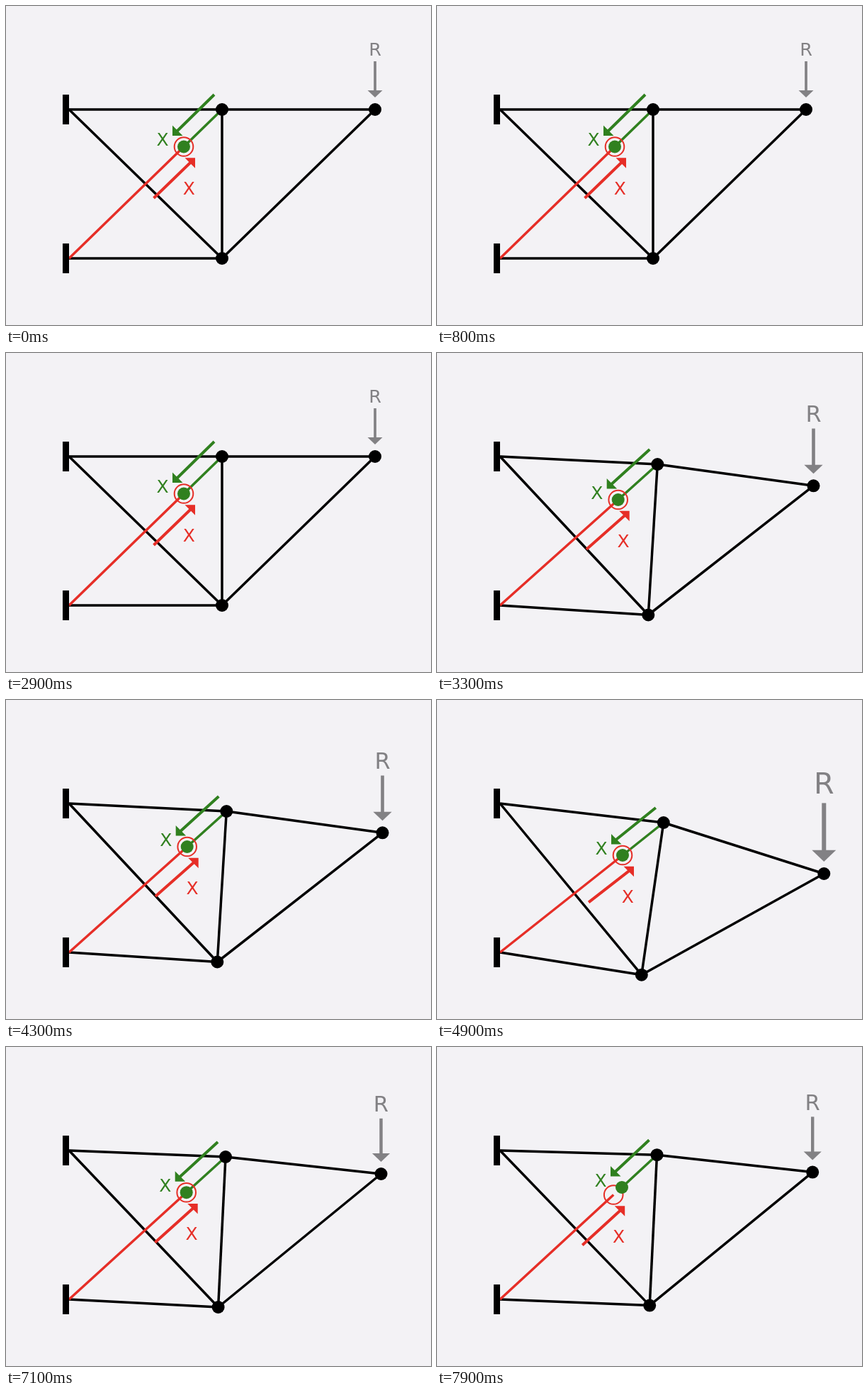
An HTML page with a canvas that plays this animation: 600x450 px, repeating every 8000 ms.

```html
<!DOCTYPE html>
<html lang="en">
<head>
<meta charset="utf-8">
<title>Loaded truss</title>
<style>
  html, body { margin: 0; width: 100%; height: 100%; overflow: hidden; background: #f3f2f5; }
  canvas { display: block; }
</style>
</head>
<body>
<canvas id="stage" width="600" height="450"></canvas>
<script>
const ctx = document.getElementById('stage').getContext('2d');
const LOOP = 8000;
const GREEN = '#30801f', RED = '#e62e27', GRAY = '#828184';
const FONT = '"DejaVu Sans", Verdana, sans-serif';

// Fixed supports
const P = [89, 146], Q = [89, 356];

// Poses held from `at` on; ring and ball are the two ends of the split strut
const poses = [
  { at: 0,    load: 1,    top: [305, 146],     low: [305, 356],     tip: [521, 146],     ball: [251, 198.5],   ring: [251, 198.5] },
  { at: 3000, load: 1.25, top: [311.3, 157],   low: [298.3, 369.5], tip: [531.5, 187.3], ball: [255.7, 207],   ring: [255.7, 207] },
  { at: 4500, load: 1.62, top: [319.8, 173],   low: [288.8, 387.7], tip: [546.3, 245],   ball: [262, 219],     ring: [262, 219] },
  { at: 6100, load: 1.2,  top: [310, 155],     low: [299.6, 367],   tip: [529.5, 179],   ball: [254.7, 205.2], ring: [254.7, 205.2] },
  { at: 7600, load: 1.2,  top: [310.5, 152.2], low: [300.2, 364.6], tip: [530.2, 176.6], ball: [261, 198],     ring: [249.2, 208.5] }
];

const add = ([x, y], dx, dy) => [x + dx, y + dy];

function line(a, b, color, width = 3.5) {
  ctx.strokeStyle = color;
  ctx.lineWidth = width;
  ctx.beginPath();
  ctx.moveTo(...a);
  ctx.lineTo(...b);
  ctx.stroke();
}

function poly(color, ...pts) {
  ctx.fillStyle = color;
  ctx.beginPath();
  pts.forEach(p => ctx.lineTo(...p));
  ctx.fill();
}

function dot(p, color) {
  ctx.fillStyle = color;
  ctx.beginPath();
  ctx.arc(...p, 9, 0, 7);
  ctx.fill();
}

function label(text, [x, y], size, color) {
  ctx.font = `${size}px ${FONT}`;
  ctx.textAlign = 'center';
  ctx.fillStyle = color;
  ctx.fillText(text, x, y);
}

// Diagonal arrow with a square-cornered head; side = 1 points up right, -1 down left
function forceArrow(from, to, side, color) {
  line(from, add(to, -5 * side, 5 * side), color, 4);
  poly(color, to, add(to, -14.5 * side, 0), add(to, 0, 14.5 * side));
}

function loadArrow([x, y], k) {
  const end = y - 17, start = end - 51 * k, neck = end - 10 * k;
  line([x, start], [x, neck + 1], GRAY, 3.7 * k);
  poly(GRAY, [x - 10.5 * k, neck], [x + 10.5 * k, neck], [x, end]);
  label('R', [x, start - 8 * k], 25.5 * k, GRAY);
}

function draw(t) {
  const { load, top, low, tip, ball, ring } = poses.findLast(p => p.at <= t);
  ctx.fillStyle = '#f3f2f5';
  ctx.fillRect(0, 0, 600, 450);

  const bars = [[P, top], [top, tip], [tip, low], [low, top], [P, low], [Q, low]];
  bars.forEach(([a, b]) => line(a, b, '#000'));
  line(Q, ring, RED);
  line(top, ball, GREEN);

  ctx.fillStyle = '#000';
  [P, Q].forEach(([x, y]) => ctx.fillRect(x - 9, y - 21, 9, 42));
  [top, low, tip].forEach(p => dot(p, '#000'));

  ctx.strokeStyle = RED;
  ctx.lineWidth = 2;
  ctx.beginPath();
  ctx.arc(...ring, 13.3, 0, 7);
  ctx.stroke();
  dot(ball, GREEN);

  forceArrow(add(top, -11, -21), add(ball, -16, -15.5), -1, GREEN);
  label('X', add(ball, -30, -1.3), 25, GREEN);

  const dx = ring[0] - Q[0], dy = ring[1] - Q[1], s = 81.5 / Math.hypot(dx, dy);
  const head = add(ring, 16, 15.7);
  forceArrow(add(head, -dx * s, -dy * s), head, 1, RED);
  label('X', add(ring, 7.4, 67), 25, RED);

  loadArrow(tip, load);
}

const begin = performance.now();
function tick() {
  draw((performance.now() - begin) % LOOP);
  requestAnimationFrame(tick);
}
tick();
</script>
</body>
</html>
```
